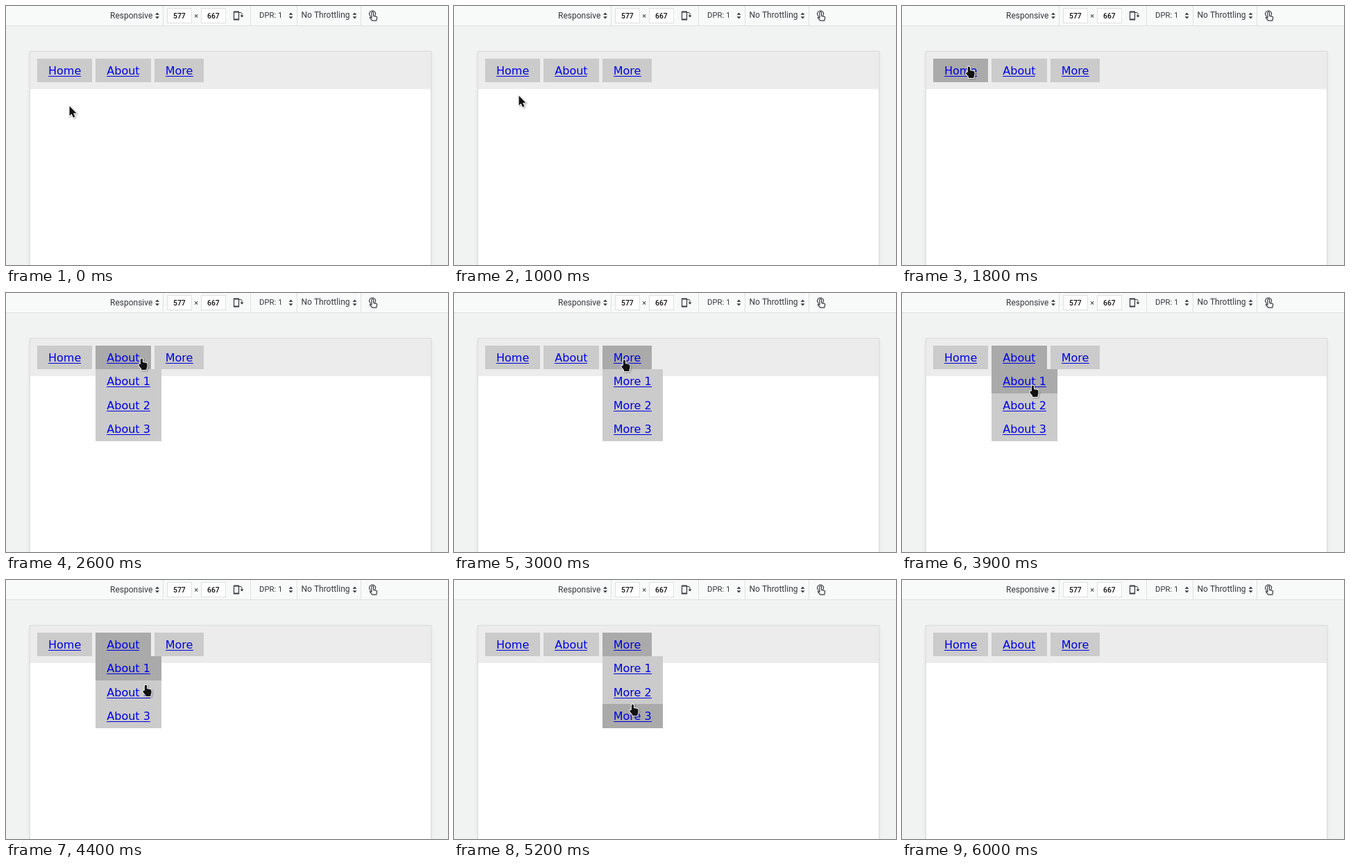
These frames come from a looping animation (637x374 px, 7 s). An HTML page with a canvas:

```html
<!DOCTYPE html>
<html lang="en">
<head>
<meta charset="utf-8">
<title>Drop-down menu</title>
<style>
html, body { margin: 0; width: 100%; height: 100%; overflow: hidden; background: #f1f3f3; }
canvas { display: block; }
</style>
</head>
<body>
<canvas id="stage" width="637" height="374"></canvas>
<script>
const ctx = document.getElementById('stage').getContext('2d');
const LOOP = 7000, STEP = 100;
const UI = 'Roboto, "Noto Sans", sans-serif';
const LINK = '16px "DejaVu Sans", sans-serif';
const PAD = 16, INK = '#38383d', LINE = '#dfe0e0';

// Pointer strokes as [time, x, y] keys; it rests between strokes
const strokes = [
  [[0, 91, 144]],
  [[900, 92, 139], [1400, 95, 89]],
  [[1800, 96, 87], [2300, 170, 96]],
  [[2500, 183, 94], [3000, 245, 96]],
  [[3200, 226, 96], [3400, 184, 95], [3900, 188, 133]],
  [[4000, 190, 165], [4100, 194, 207], [4300, 201, 135], [4400, 201, 151]],
  [[4600, 203, 130], [4700, 203, 104], [4800, 222, 98], [5100, 258, 187], [5200, 257, 179], [5300, 259, 184]],
  [[5400, 253, 189]],
  [[5600, 240, 126], [5800, 108, 88], [5900, 100, 2]]
];

const rowTop = row => Math.floor(76 + 34.5 * row);
const inside = (v, start, size) => v >= start && v < start + size;

function textWidth(str) {
  ctx.font = LINK;
  return ctx.measureText(str).width;
}

// Menu buttons sit side by side, one space apart
let nextX = 45;
const menus = ['Home', 'About', 'More'].map(label => {
  const x = nextX, w = textWidth(label) + 2 * PAD;
  nextX += w + textWidth(' ');
  return { label, x, w, items: label === 'Home' ? 0 : 3, subW: textWidth(label + ' 1') + 2 * PAD };
});

function along(keys, t) {
  const i = keys.findLastIndex(k => k[0] <= t);
  const a = keys[i], b = keys[i + 1] || a;
  const u = (t - a[0]) / (b[0] - a[0] || 1);
  return [1, 2].map(n => Math.round(a[n] + (b[n] - a[n]) * u));
}

// Finds the hovered cell; a submenu only counts while it is open
function hit([x, y], open) {
  const row = [0, 1, 2, 3].find(r => inside(y, rowTop(r), rowTop(r + 1) - rowTop(r)));
  if (row === undefined) return null;
  const menu = menus.findIndex((m, i) => row === 0
    ? inside(x, m.x, m.w)
    : i === open && inside(x, m.x, m.subW));
  return menu < 0 ? null : { menu, row };
}

const steps = [];
for (const keys of strokes)
  for (let t = keys[0][0]; t <= keys.at(-1)[0]; t += STEP)
    steps.push({ t, pos: along(keys, t), hover: null });
steps.push({ t: 6000, pos: null, hover: null });

// The page reacts one step after the pointer
for (let i = 1; i < steps.length; i++) {
  const last = steps[i - 1];
  steps[i].hover = hit(last.pos, last.hover ? last.hover.menu : -1);
}

function box(x, y, w, h, color) {
  ctx.fillStyle = color;
  ctx.fillRect(x, y, w, h);
}

function text(str, x, y, font, color) {
  ctx.font = font;
  ctx.fillStyle = color;
  ctx.fillText(str, x, y);
}

function shape(d, x, y, fill, stroke, width = 1) {
  const path = new Path2D(d);
  ctx.save();
  ctx.translate(x, y);
  ctx.lineWidth = width;
  ctx.lineJoin = ctx.lineCap = 'round';
  if (stroke) { ctx.strokeStyle = stroke; ctx.stroke(path); }
  if (fill) { ctx.fillStyle = fill; ctx.fill(path); }
  ctx.restore();
}

function sizeField(str, x) {
  box(x, 3, 36, 22, LINE);
  box(x + 1, 4, 34, 20, '#fff');
  text(str, x + 9, 18, `500 10.4px ${UI}`, '#0c0c0d');
}

function toolbar() {
  box(0, 0, 637, 28, '#f8f9f9');
  box(0, 28, 637, 1, LINE);
  for (const x of [226, 352, 419, 511]) box(x, 0, 1, 28, LINE);
  text('Responsive', 150, 18, `12px ${UI}`, INK);
  text('DPR: 1', 365, 17, `11.3px ${UI}`, INK);
  text('No Throttling', 425.5, 17, `12px ${UI}`, INK);
  for (const x of [218, 410.5, 502.5])
    shape('M-3-1.2L0-4.5L3-1.2ZM-3 1.2L0 4.5L3 1.2Z', x, 14, INK);
  sizeField('577', 232);
  sizeField('667', 281);
  text('×', 271.2, 18, `11px ${UI}`, INK);

  // rotate icon
  shape('M0 0H7V12H0ZM0 1H7M0 11H7', 328.5, 8, null, INK, 1.2);
  shape('M0 0H1.5Q3.5 0 3.5 2V5', 336.5, 9.5, null, INK);
  shape('M-2.5 0H2.5L0 3Z', 340, 13.5, INK);

  // touch icon
  shape('M-3.2 4.2A4.4 4.4 0 1 1 4 3.3', 528, 10, null, INK, 1.1);
  shape('M-1.4 9V1.4Q-1.4 0 0 0T1.4 1.4V6L5 6.8Q6.7 7.2 6.4 9L5.5 12.8H-.5L-3.8 8.7Q-4 7-2.4 7.6L-1.4 8.6',
    528.3, 8.3, null, INK, 1.2);
}

function page() {
  box(0, 0, 637, 374, '#f1f3f3');
  ctx.save();
  ctx.shadowColor = 'rgba(0,0,0,.1)';
  ctx.shadowBlur = 4;
  ctx.shadowOffsetY = 2;
  box(34, 65, 579, 340, '#dcdddd');
  ctx.restore();
  box(35, 66, 577, 308, '#fff');
  box(35, 66, 577, 54, '#ececec');
}

function cell(str, x, row, w, active) {
  const y = rowTop(row), left = Math.round(x), tx = x + PAD;
  box(left, y, Math.round(x + w) - left, rowTop(row + 1) - y, active ? '#aaa' : '#cbcbcb');
  text(str, tx, y + 23, LINK, '#0000e0');
  box(Math.round(tx), y + 25, Math.round(w - 2 * PAD), 1, '#0000e0');
}

function nav(over) {
  menus.forEach((m, i) => {
    const open = over !== null && over.menu === i;
    cell(m.label, m.x, 0, m.w, open);
    if (!open) return;
    for (let row = 1; row <= m.items; row++)
      cell(`${m.label} ${row}`, m.x, row, m.subW, over.row === row);
  });
}

function pointer([x, y], hand) {
  const d = hand
    ? 'M-1.7 8.5V1.6Q-1.7 0 0 0T1.6 1.6V5.4L7 6.5Q8 7 8 8.8V12L7 14.5V16.5H-.5V14.8L-4 10.5Q-4.6 8-2.8 8Z'
    : 'M0 0V14L3.1 11.2L5.4 16.5L7.9 15.3L5.6 10.2H10Z';
  ctx.save();
  ctx.shadowColor = 'rgba(0,0,0,.35)';
  ctx.shadowBlur = 2;
  ctx.shadowOffsetX = ctx.shadowOffsetY = 1;
  shape(d, x + .5, y + .5, null, '#fff', 2);
  ctx.restore();
  shape(d, x + .5, y + .5, '#111');
}

function draw(now) {
  const t = now % LOOP;
  const { pos, hover } = steps.findLast(s => s.t <= t);
  page();
  toolbar();
  nav(hover);
  if (pos) pointer(pos, hover !== null);
}

function frame() {
  draw(performance.now());
  requestAnimationFrame(frame);
}
frame();
</script>
</body>
</html>
```
